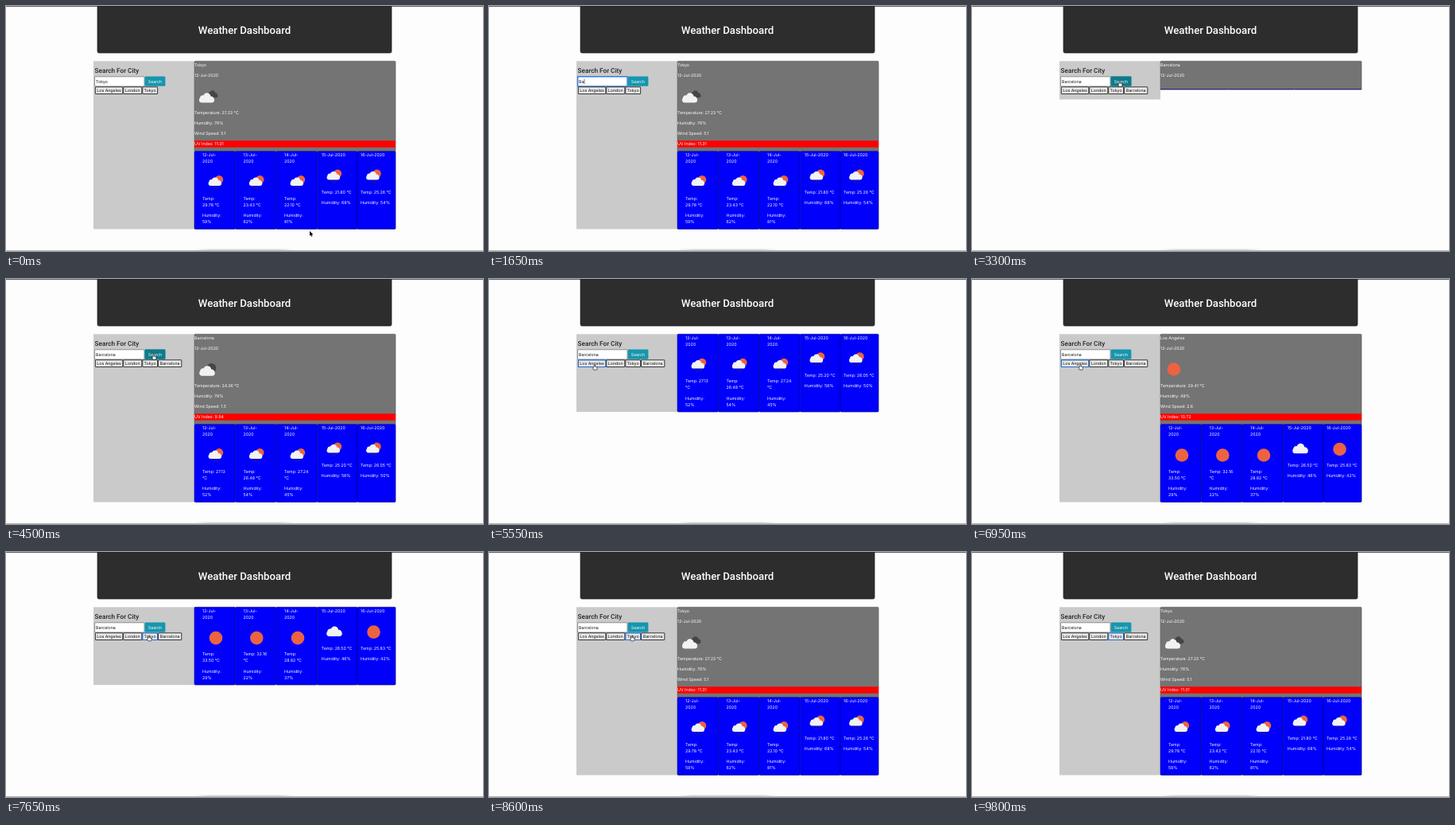
An HTML page with a canvas that plays this animation: 600 px wide and 308 px high, repeating every 9850 ms.

```html
<!DOCTYPE html>
<html lang="en">
<head>
<meta charset="utf-8">
<title>Weather Dashboard</title>
<style>
html, body { margin: 0; width: 100%; height: 100%; overflow: hidden; background: #fdfdfd; }
canvas { display: block; width: 600px; height: 308px; }
</style>
</head>
<body>
<canvas id="stage"></canvas>
<script>
const LOOP = 9850;
const TOP = 69.3;
const BODY = 'Inter, sans-serif';
const HEADING = 'Roboto, sans-serif';
const SUN = '#ec6342';

const canvas = document.getElementById('stage');
const ctx = canvas.getContext('2d');
const ratio = window.devicePixelRatio || 1;
canvas.width = 600 * ratio;
canvas.height = 308 * ratio;

// Forecast days: temperature, humidity, icon, and whether the temperature wraps before its unit.
const cities = {
  'Tokyo': {
    icon: 'clouds', now: ['27.23', 76, '5.1', '11.31'],
    days: [['29.78', 59, 'rain'], ['23.43', 62, 'rain'], ['22.10', 81, 'rain'],
           ['21.80', 68, 'rain'], ['25.26', 54, 'rain']]
  },
  'Barcelona': {
    icon: 'night', now: ['24.36', 78, '1.5', '9.94'],
    days: [['27.13', 52, 'rain', true], ['26.48', 54, 'rain'], ['27.24', 45, 'rain', true],
           ['25.20', 58, 'rain'], ['26.05', 50, 'rain']]
  },
  'Los Angeles': {
    icon: 'sun', now: ['29.41', 48, '2.6', '10.72'],
    days: [['33.50', 29, 'sun'], ['32.16', 22, 'sun', true], ['28.82', 37, 'sun'],
           ['26.50', 46, 'cloud'], ['25.83', 42, 'sun']]
  }
};
const cardEdges = [237, 288.3, 339.8, 391.2, 442, 490];
const cardText = [247, 298.5, 350, 396.8, 446];
const cardIcons = [264, 315.3, 367, 413, 462.5];

// Start time, city shown, parts loaded (1 heading, 2 icon, 3 details), forecast shown.
const stages = [
  [0, 'Tokyo', 3, 'Tokyo'],
  [2950, '', 0, 'Tokyo'],
  [3150, 'Barcelona', 1],
  [3450, 'Barcelona', 2],
  [3950, 'Barcelona', 3],
  [4450, 'Barcelona', 3, 'Barcelona'],
  [5500, '', 0, 'Barcelona'],
  [5650, 'Los Angeles', 1],
  [6250, 'Los Angeles', 2],
  [6450, 'Los Angeles', 3],
  [6750, 'Los Angeles', 3, 'Los Angeles'],
  [7600, '', 0, 'Los Angeles'],
  [7750, 'Tokyo', 1],
  [7950, 'Tokyo', 2],
  [8150, 'Tokyo', 3],
  [8400, 'Tokyo', 3, 'Tokyo']
];

// Start and end time of each pointer move, with its destination.
const pointerStart = [382, 283];
const moves = [
  [50, 850, 145, 94],
  [2400, 2800, 186, 95],
  [4700, 5300, 133, 108],
  [6850, 7450, 180, 105.5],
  [8950, 9700, 236, -10]
];

function rect(x, y, w, h, color) {
  ctx.fillStyle = color;
  ctx.fillRect(x, y, w, h);
}

function box(x, y, w, h, radius, fill, stroke, lineWidth = 0.7) {
  ctx.beginPath();
  ctx.roundRect(x, y, w, h, radius);
  if (fill) { ctx.fillStyle = fill; ctx.fill(); }
  if (stroke) { ctx.strokeStyle = stroke; ctx.lineWidth = lineWidth; ctx.stroke(); }
}

function disc(x, y, r, color) {
  ctx.fillStyle = color;
  ctx.beginPath();
  ctx.arc(x, y, r, 0, 2 * Math.PI);
  ctx.fill();
}

// Small type is laid out large and scaled down so that advances stay fractional.
function setFont(size, family, weight) {
  ctx.font = `${weight} ${size * 4}px ${family}`;
  ctx.textRendering = 'geometricPrecision';
}

function text(str, x, y, { color = '#fff', size = 5.25, align = 'left', family = BODY, weight = 400 } = {}) {
  ctx.save();
  ctx.translate(x, y);
  ctx.scale(0.25, 0.25);
  setFont(size, family, weight);
  ctx.textAlign = align;
  ctx.fillStyle = color;
  ctx.fillText(str, 0, 0);
  ctx.restore();
}

function textWidth(str) {
  ctx.save();
  setFont(5.25, BODY, 400);
  const width = ctx.measureText(str).width / 4;
  ctx.restore();
  return width;
}

function cloud(x, y, w, color) {
  ctx.save();
  ctx.translate(x, y);
  ctx.scale(w / 20, w / 20);
  box(-10, -1, 20, 7, 3.5, color);
  disc(-5.2, 0, 3.7, color);
  disc(0.3, -1.8, 5, color);
  disc(5.5, 1.3, 3.7, color);
  ctx.restore();
}

const icons = {
  sun(x, y) { disc(x, y, 8.3, SUN); },
  cloud(x, y) { cloud(x, y - 0.5, 19.5, '#f2f2f2'); },
  clouds(x, y) {
    cloud(x + 5.5, y - 2.5, 14, '#454545');
    cloud(x - 1.5, y + 2.3, 19, '#f2f2f2');
  },
  night(x, y) {
    disc(x + 4.5, y - 1.5, 6, '#454545');
    cloud(x - 1, y + 2.3, 19.5, '#f2f2f2');
  },
  rain(x, y) {
    disc(x + 4, y - 3.2, 5.2, SUN);
    cloud(x - 1.2, y - 0.5, 16.5, '#f2f2f2');
    ctx.strokeStyle = '#333350';
    ctx.lineWidth = 1;
    for (const [dx, dy] of [[-4, 5.5], [-0.8, 5.5], [2.5, 5.5], [-2.2, 8], [1, 8]]) {
      ctx.beginPath();
      ctx.moveTo(x + dx + 0.6, y + dy - 0.8);
      ctx.lineTo(x + dx - 0.4, y + dy + 0.8);
      ctx.stroke();
    }
  }
};

function drawPage() {
  rect(0, 0, 600, 308, '#fdfdfd');
  box(115, -3, 370, 62, 2, '#2d2d2d', '#222');
  rect(0, 0, 600, 0.7, '#222');
  text('Weather Dashboard', 300, 34.7, { size: 13.2, align: 'center', family: HEADING, weight: 500 });

  const dock = ctx.createLinearGradient(236, 0, 364, 0);
  dock.addColorStop(0, 'rgba(150,150,150,0)');
  dock.addColorStop(0.15, 'rgba(150,150,150,.35)');
  dock.addColorStop(0.85, 'rgba(150,150,150,.35)');
  dock.addColorStop(1, 'rgba(150,150,150,0)');
  rect(236, 305.5, 128, 2.5, dock);
  rect(0, 307, 600, 1, '#b5b5b5');
}

function inputText(t) {
  if (t < 1350) return 'Tokyo';
  if (t < 1500) return '';
  return 'Barcelona'.slice(0, 1 + Math.floor((t - 1500) / 105));
}

function drawSearch(t, bottom) {
  rect(110, TOP, 127, bottom - TOP, '#cacaca');
  text('Search For City', 111.6, 84.2, { color: '#212529', size: 8.2, family: HEADING, weight: 500 });

  const typing = t >= 900 && t < 2900;
  const value = inputText(t);
  box(111.6, 88.8, 62.4, 12.2, 0.3, '#fff', typing ? '#2f7de0' : '#777', typing ? 1.4 : 0.8);
  text(value, 113, 96.9, { color: '#111' });
  if (typing) rect(113.3 + textWidth(value), 92, 0.6, 6, '#111');

  const pressed = t >= 2900 && t < 5450;
  const hover = t >= 2750 && t < 4900;
  if (pressed) box(174, 88, 27, 13.4, 1.8, 'rgba(58,176,195,.6)');
  box(174.6, 88.6, 25.8, 12.2, 1.3, hover || pressed ? '#117a8b' : '#1696ae');
  text('Search', 187.5, 96.7, { align: 'center' });

  const focused = t >= 5450 && t < 7550 ? 'Los Angeles' : t >= 7550 ? 'Tokyo' : '';
  const buttons = [['Los Angeles', 112, 35], ['London', 147.4, 23.6], ['Tokyo', 171.4, 19.4]];
  if (t >= 2950) buttons.push(['Barcelona', 191.2, 29.8]);
  for (const [name, x, w] of buttons) {
    const active = name === focused;
    box(x + 0.4, 101.8, w - 0.6, 8.7, 0.3, '#e9e9e9', active ? '#2468c8' : '#222', active ? 1.2 : 0.9);
    text(name, x + w / 2, 108, { color: '#111', align: 'center' });
  }
}

function drawCurrent(name, level, bottom) {
  const city = cities[name];
  box(237, TOP, 253, bottom - TOP, [1.3, 1.3, 0, 0], '#747474', '#5c5c5c', 0.6);
  text(name, 237, 75.8);
  text('12-Jul-2020', 237, 89.1);
  if (level >= 2) icons[city.icon](254, 113.5);
  if (level < 3) return;
  const [temp, humidity, wind, uv] = city.now;
  text(`Temperature: ${temp} °C`, 237, 135.5);
  text(`Humidity: ${humidity}%`, 237, 148.6);
  text(`Wind Speed: ${wind}`, 237, 161.9);
  rect(237, 169.3, 253, 8.4, '#f00');
  text(`UV Index: ${uv}`, 237, 175.3);
}

function drawForecast(name, top) {
  cities[name].days.forEach(([temp, humidity, icon, unitWraps], i) => {
    const left = cardEdges[i];
    const x = cardText[i];
    const line = (str, y) => text(str, x, top + y);
    box(left, top, cardEdges[i + 1] - left, 97.8, 1.3, '#0000fb', '#000078', 0.6);
    const narrow = i < 3;
    icons[icon](cardIcons[i], top + (narrow ? 38.8 : 31.3));
    if (narrow) {
      line(`${12 + i}-Jul-`, 6.7);
      line('2020', 14.7);
      line(unitWraps ? `Temp: ${temp}` : 'Temp:', 61);
      line(unitWraps ? '°C' : `${temp} °C`, 69);
      line('Humidity:', 82.2);
      line(`${humidity}%`, 90.2);
    } else {
      line(`${12 + i}-Jul-2020`, 6.7);
      line(`Temp: ${temp} °C`, 53.2);
      line(`Humidity: ${humidity}%`, 66.2);
    }
  });
}

function drawEmptyForecast(y, level) {
  const color = level === 1 ? '#26267c' : '#0c0cd8';
  for (let i = 0; i < 3; i++) rect(237 + i * 84.4, y - 1, 83.8, 1.2, color);
}

function pointerAt(t) {
  let [x, y] = pointerStart;
  for (const [start, end, toX, toY] of moves) {
    if (t < start) break;
    const p = Math.min(1, (t - start) / (end - start));
    const ease = p * p * (3 - 2 * p);
    x += (toX - x) * ease;
    y += (toY - y) * ease;
  }
  return [x, y];
}

function drawPointer(t) {
  if (t >= 1350 && t < 2400) return;
  const [x, y] = pointerAt(t);
  const overInput = x > 111 && x < 174 && y > 88 && y < 101;
  const overButton = (x >= 174 && x < 201 && y > 88 && y < 101) ||
                     (x > 112 && x < 221 && y >= 101 && y < 111);
  ctx.save();
  ctx.translate(x, y);
  if (overInput) {
    rect(-0.4, -3.5, 0.8, 7, '#222');
    rect(-1.5, -3.7, 3, 0.6, '#222');
    rect(-1.5, 3.1, 3, 0.6, '#222');
  } else if (overButton) {
    box(-0.8, -0.2, 1.5, 4.5, 0.8, '#fff', '#111', 0.7);
    box(-2, 2.3, 5, 4, 1.4, '#fff', '#111', 0.7);
    rect(-0.5, 1.8, 0.9, 2, '#fff');
  } else {
    ctx.beginPath();
    for (const [px, py] of [[0, 0], [0, 6], [1.4, 4.8], [2.4, 7], [3.4, 6.5], [2.5, 4.4], [4.3, 4.3]]) {
      ctx.lineTo(px, py);
    }
    ctx.closePath();
    ctx.strokeStyle = '#fff';
    ctx.lineWidth = 1;
    ctx.stroke();
    ctx.fillStyle = '#000';
    ctx.fill();
  }
  ctx.restore();
}

function draw(t) {
  const [, name, level, forecast] = stages.findLast(stage => stage[0] <= t);
  const currentBottom = [TOP, 105, 131, 182.7][level];
  const bottom = forecast ? currentBottom + 97.8 : Math.max(117.5, currentBottom);

  ctx.setTransform(ratio, 0, 0, ratio, 0, 0);
  drawPage();
  drawSearch(t, bottom);
  if (level) drawCurrent(name, level, currentBottom);
  if (forecast) drawForecast(forecast, currentBottom);
  else drawEmptyForecast(currentBottom, level);
  drawPointer(t);
}

const began = performance.now();
function tick() {
  draw((performance.now() - began) % LOOP);
  requestAnimationFrame(tick);
}
tick();
</script>
</body>
</html>
```
